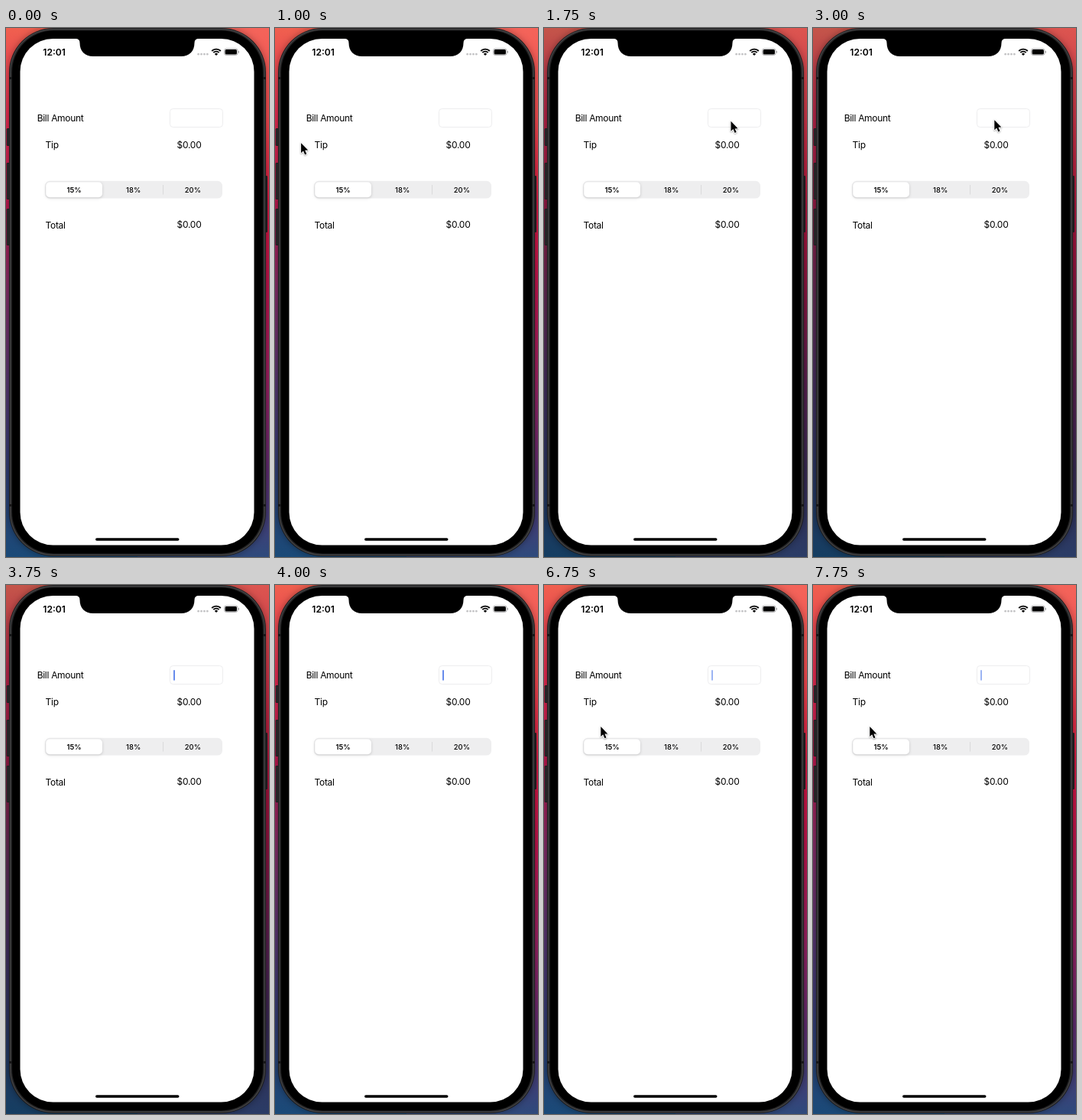
Recreate the animation shown at these times as an HTML page with a canvas. Size 344 px wide and 691 px high, loop 8 s.

```html
<!DOCTYPE html>
<html lang="en">
<head>
<meta charset="utf-8">
<title>Tip calculator</title>
<style>
  html, body { margin: 0; width: 100%; height: 100%; overflow: hidden; background: #000; }
  canvas { display: block; width: 344px; height: 691px; }
</style>
</head>
<body>
<canvas id="stage"></canvas>
<script>
const W = 344, H = 691, LOOP = 8000;
const canvas = document.getElementById('stage');
const ctx = canvas.getContext('2d');
const ratio = window.devicePixelRatio || 1;
canvas.width = W * ratio;
canvas.height = H * ratio;

// Wallpaper colours from top to bottom, for each side
const bright = {
  left: ['#f0604f', '#e02a4e', '#b5184c', '#7d2c64', '#54346c', '#2f3a70', '#1a4a78'],
  right: ['#f4645a', '#f04a4e', '#d0163f', '#b8144c', '#96205f', '#5c2a6c', '#2e4a7c']
};
const dim = {
  left: ['#c4554a', '#b02245', '#8e1a42', '#5d284f', '#422c58', '#28325c', '#153e62'],
  right: ['#dc5550', '#c83446', '#a81439', '#84143e', '#561e4c', '#352850', '#2a3c66']
};

// Pointer stops: start time, tip x, tip y (no place means hidden)
const pointer = [
  [0], [750, 35, 121.5], [1000, 33.8, 150.2], [1250, 243, 138],
  [1500, 244.2, 121.8], [2500, 237, 120.2], [3500, 275, 39.6], [3750],
  [5750, 38, 115], [6000, 67, 170.5], [6250, 74, 185]
];

function box(x, y, w, h, r, fill) {
  ctx.beginPath();
  ctx.roundRect(x, y, w, h, r);
  ctx.fillStyle = fill;
  ctx.fill();
}

function shadow(color, blur, dy) {
  ctx.shadowColor = color;
  ctx.shadowBlur = blur * ratio;
  ctx.shadowOffsetY = dy * ratio;
}

function text(str, x, y, size, weight, spacing, align = 'left') {
  ctx.font = `${weight} ${size}px Inter, "Liberation Sans", sans-serif`;
  ctx.letterSpacing = spacing + 'px';
  ctx.textAlign = align;
  ctx.fillStyle = '#000';
  ctx.fillText(str, x, y);
}

function wallpaper(colors) {
  ['left', 'right'].forEach((side, i) => {
    const g = ctx.createLinearGradient(0, 0, 0, H);
    colors[side].forEach((c, k, all) => g.addColorStop(k / (all.length - 1), c));
    ctx.fillStyle = g;
    ctx.fillRect(i * W / 2, 0, W / 2, H);
  });
}

function button(x, y, h) {
  box(x, y, 4.5, h, 1.2, '#242125');
  ctx.fillStyle = '#3c383c';
  ctx.fillRect(x + 1.5, y + 1, 1, h - 2);
}

function phone() {
  button(0.8, 131, 23);
  button(0.8, 176, 48);
  button(0.8, 236, 48);
  button(337.5, 193, 74);

  ctx.save();
  shadow('rgba(0,0,0,.35)', 10, 0);
  box(4, 0, 336, 690, 58, '#1b1b1c');
  ctx.restore();
  box(5, 1, 334, 688, 57, '#454547');
  box(6.2, 2.2, 331.6, 685.6, 56, '#232324');
  box(8, 3.6, 328, 682.8, 54, '#000');
  ctx.fillStyle = '#161617';
  for (const y of [64, 622]) {
    ctx.fillRect(4, y, 4, 3);
    ctx.fillRect(336, y, 4, 3);
  }
  box(18.5, 14, 306, 661.5, 43, '#fff');

  // Notch
  ctx.beginPath();
  ctx.moveTo(91, 13);
  ctx.lineTo(91, 14);
  ctx.quadraticCurveTo(96.5, 14, 96.5, 19.5);
  ctx.bezierCurveTo(96.5, 30, 103, 37, 114, 37);
  ctx.lineTo(229, 37);
  ctx.bezierCurveTo(240, 37, 246.5, 30, 246.5, 19.5);
  ctx.quadraticCurveTo(246.5, 14, 252, 14);
  ctx.lineTo(252, 13);
  ctx.fillStyle = '#000';
  ctx.fill();

  box(117, 666.2, 109.5, 3.5, 1.75, '#000');
}

function statusBar() {
  text('12:01', 48.3, 35.8, 12.1, 600, 0);

  for (let i = 0; i < 4; i++) box(250.3 + i * 3.9, 32.8, 2.7, 2.7, 1.35, '#c4c4c6');

  ctx.strokeStyle = '#000';
  ctx.lineWidth = 1.9;
  for (const r of [8.2, 5.2]) {
    ctx.beginPath();
    ctx.arc(275, 35.8, r, -Math.PI * 0.75, -Math.PI * 0.25);
    ctx.stroke();
  }
  ctx.beginPath();
  ctx.moveTo(275, 36);
  ctx.arc(275, 36, 3, -Math.PI * 0.75, -Math.PI * 0.25);
  ctx.fillStyle = '#000';
  ctx.fill();

  ctx.beginPath();
  ctx.roundRect(285.5, 27, 17.5, 8.5, 2.6);
  ctx.strokeStyle = '#a0a0a2';
  ctx.lineWidth = 0.8;
  ctx.stroke();
  box(286.6, 28.1, 15.3, 6.3, 1.5, '#000');
  box(303.8, 29.8, 1.1, 3, 0.6, '#a0a0a2');
}

function form() {
  text('Bill Amount', 40.7, 122.3, 12, 400, -0.3);
  text('Tip', 51.5, 157.4, 12, 400, -0.25);
  text('$0.00', 223.5, 157.4, 12, 400, -0.25);
  text('Total', 51.5, 261.7, 12, 400, -0.3);
  text('$0.00', 223.5, 261.2, 12, 400, -0.25);

  ctx.beginPath();
  ctx.roundRect(214.5, 105.5, 69, 24, 4);
  ctx.strokeStyle = '#ebebec';
  ctx.lineWidth = 0.9;
  ctx.stroke();

  box(51, 199.8, 232, 22.8, 6.3, '#eeeeef');
  ctx.save();
  shadow('rgba(0,0,0,.18)', 3.5, 1);
  box(52.2, 201.2, 73.8, 20, 5, '#fff');
  ctx.restore();
  ctx.fillStyle = '#d6d6d8';
  ctx.fillRect(205, 205, 0.9, 12.5);
  text('15%', 89.1, 214.6, 9.4, 600, 0, 'center');
  text('18%', 166.7, 214.6, 9.4, 500, 0.1, 'center');
  text('20%', 244.4, 214.6, 9.4, 500, 0.1, 'center');
}

function caretAlpha(t) {
  if (t < 3500) return 0;
  const phase = t % 1000;
  if (t < 4500 || phase < 500) return 1;
  return phase < 750 ? 0 : 0.65;
}

function caret(t) {
  ctx.globalAlpha = caretAlpha(t);
  box(219.2, 111, 1.6, 13.8, 0.8, '#416ee8');
  ctx.globalAlpha = 1;
}

function arrow(t) {
  const [, x, y] = pointer.findLast(p => p[0] <= t);
  if (x === undefined) return;
  ctx.save();
  ctx.translate(x, y);
  ctx.beginPath();
  ctx.moveTo(0.3, 0);
  ctx.lineTo(0.3, 13);
  ctx.lineTo(3.2, 10.3);
  ctx.lineTo(5.4, 15.3);
  ctx.lineTo(7.5, 14.3);
  ctx.lineTo(5.4, 9.6);
  ctx.lineTo(9.4, 9.4);
  ctx.closePath();
  shadow('rgba(0,0,0,.35)', 2, 0.8);
  ctx.lineJoin = 'round';
  ctx.lineWidth = 1.8;
  ctx.strokeStyle = '#fff';
  ctx.stroke();
  ctx.shadowColor = 'transparent';
  ctx.fillStyle = '#000';
  ctx.fill();
  ctx.restore();
}

function draw(t) {
  ctx.setTransform(ratio, 0, 0, ratio, 0, 0);
  wallpaper(t >= 1750 && t < 4000 ? dim : bright);
  phone();
  statusBar();
  form();
  caret(t);
  arrow(t);
}

const start = performance.now();
function tick() {
  draw((performance.now() - start) % LOOP);
  requestAnimationFrame(tick);
}
tick();
</script>
</body>
</html>
```
